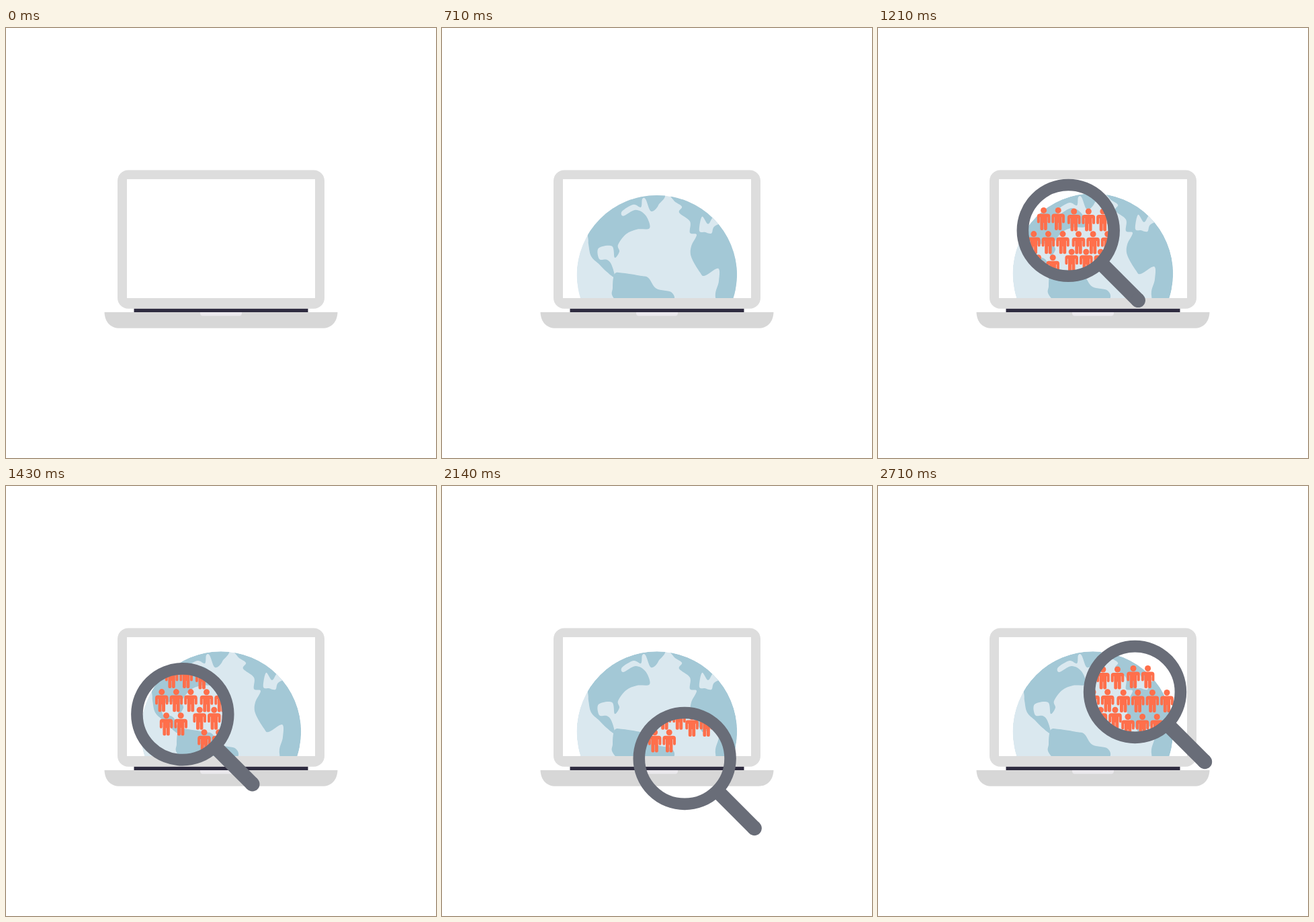
Recreate the animation shown at these times as an HTML page. Size 640 by 640 pixels, loop 3 s.

```html
<!DOCTYPE html>
<html lang="en">
<head>
<meta charset="utf-8">
<title>Global people search</title>
<style>
  html, body { margin: 0; width: 100%; height: 100%; overflow: hidden; background: #fff; }
  svg { display: block; width: 100vw; height: 100vh; }
</style>
</head>
<body>
<svg viewBox="0 0 640 640">
  <defs>
    <clipPath id="screen"><rect x="180" y="225" width="280" height="177"/></clipPath>
    <clipPath id="disc"><circle cx="319.8" cy="365.6" r="119.4"/></clipPath>
    <clipPath id="glass"><circle id="hole" r="60"/></clipPath>
    <path id="route"/>
    <g id="person">
      <circle r="4.5"/>
      <path d="M-6 5H6a3.8 3.8 0 0 1 3.8 3.8V17a2 2 0 0 1-4 0V10.2H5.2V27.6a2 2 0 0 1-2 2H2.3a2 2 0 0 1-2-2V18.5H-.3V27.6a2 2 0 0 1-2 2H-3.2a2 2 0 0 1-2-2V10.2H-5.8V17a2 2 0 0 1-4 0V8.8A3.8 3.8 0 0 1-6 5Z"/>
    </g>
  </defs>

  <rect x="166" y="211.5" width="308" height="206.3" rx="16" fill="#ddd"/>
  <rect x="180" y="225" width="280" height="177" fill="#fff"/>
  <rect x="190.5" y="417.8" width="259" height="5.4" fill="#2e2b3f"/>
  <path d="M146.5 423H493.5C493 438 484 446.8 471 446.8H169C156 446.8 147 438 146.5 423Z" fill="#d7d7d7"/>
  <path d="M289 423H351V424.5a4 4 0 0 1-4 4H293a4 4 0 0 1-4-4Z" fill="#eae8ec"/>

  <g clip-path="url(#screen)"><g clip-path="url(#disc)">
    <g id="globe" clip-path="url(#disc)">
      <circle cx="319.8" cy="365.6" r="119.4" fill="#dae8ef"/>
      <g id="land" fill="#a3c8d6"></g>
    </g>
  </g></g>

  <g id="search" opacity="0">
    <g clip-path="url(#glass)"><g id="people" fill="#ff6f4b"></g></g>
    <g id="lens" fill="none" stroke="#696d78">
      <circle r="67.9" stroke-width="17.6"/>
      <path d="M52 52L103.9 103.9" stroke-width="21.6"/>
      <circle cx="103.9" cy="103.9" r="10.8" fill="#696d78" stroke="none"/>
    </g>
  </g>
</svg>
<script>
const $ = id => document.getElementById(id);
const clamp = v => Math.min(1, Math.max(0, v));

function add(parent, tag, attrs) {
  const el = document.createElementNS('http://www.w3.org/2000/svg', tag);
  for (const k in attrs) el.setAttribute(k, attrs[k]);
  parent.appendChild(el);
}

// Smooth closed curve through "x,y x,y ..." points.
function smooth(text) {
  const p = text.split(' ').map(s => s.split(',').map(Number));
  const at = i => p[(i + p.length) % p.length];
  let d = 'M' + p[0];
  p.forEach((a, i) => {
    const z = at(i - 1), b = at(i + 1), c = at(i + 2);
    const c1 = a.map((v, k) => v + (b[k] - z[k]) / 6);
    const c2 = b.map((v, k) => v - (c[k] - a[k]) / 6);
    d += `C${c1} ${c2} ${b}`;
  });
  return d + 'Z';
}

const coasts = {
  northAmerica: '216,302 218,319 222,337 234,349 245,360 257,368 252,349 245,342 234,341 ' +
    '233,325 253,322 257,339 264,330 262,320 274,304 290,297 309,295 303,276 288,268 ' +
    '270,277 268,270 285,260 296,264 298,252 303,252 311,270 322,261 323,240 200,230',
  southAmerica: '257,363 270,362 295,366 307,369 319,385 342,391 342,408 300,440 257,401 254,384',
  africa: '344,242 345,254 357,263 353,272 369,285 369,302 379,305 371,322 371,338 384,361 ' +
    '391,366 411,355 412,374 407,398 420,430 470,320'
};
const sea = '387,278 396,289 405,278 420,284 405,293 401,303 391,301 383,299';

for (const name in coasts) add($('land'), 'path', { d: smooth(coasts[name]) });
add($('land'), 'path', { d: smooth(sea), fill: '#dae8ef' });

// Crowd blocks: each row steps down and slightly right; later rows may start further back.
const GAP = 21.6, SHIFT = 6.8;
const crowd = [
  { x: 246.6, y: 271.4, pitch: 35.2, back: 1, counts: [2, 3, 2] },
  { x: 291.7, y: 273, pitch: 33.8, back: 0, counts: [4, 3] },
  { x: 380, y: 271.5, pitch: 36, back: 1, counts: [2, 4, 3] },
  { x: 288.2, y: 333.2, pitch: 33.6, back: 0, counts: [4, 3] }
];
for (const { x, y, pitch, back, counts } of crowd)
  counts.forEach((count, r) => {
    const left = x + r * SHIFT - (r && back * GAP);
    for (let i = 0; i < count; i++)
      add($('people'), 'use', { href: '#person', x: left + i * GAP, y: y + r * pitch });
  });

// The lens travels this loop once at constant speed.
const route = $('route');
route.setAttribute('d', smooth(
  '382.5,306.5 337.2,284 283.7,301 262,346 276.7,393.2 320,411 361.7,405 401,343'));
const length = route.getTotalLength();

const LOOP = 3000, STEP = 1000 / 14, LAST = 38;
const RISE = 10.85, LENS = 9.6, FADE = 10;

function draw(now) {
  const n = Math.min(LAST, Math.floor((now % LOOP + 6) / STEP));
  const p = clamp(n / RISE);
  $('globe').setAttribute('transform', `translate(0 ${157.5 * (1 - p * p * (3 - 2 * p))})`);

  const { x, y } = route.getPointAtLength(length * clamp((n - LENS) / (LAST - LENS)));
  $('search').setAttribute('opacity', clamp((n - FADE) / 3.8));
  $('lens').setAttribute('transform', `translate(${x} ${y})`);
  $('hole').setAttribute('cx', x);
  $('hole').setAttribute('cy', y);
}

const start = performance.now();
function tick() {
  draw(performance.now() - start);
  requestAnimationFrame(tick);
}
tick();
</script>
</body>
</html>
```
